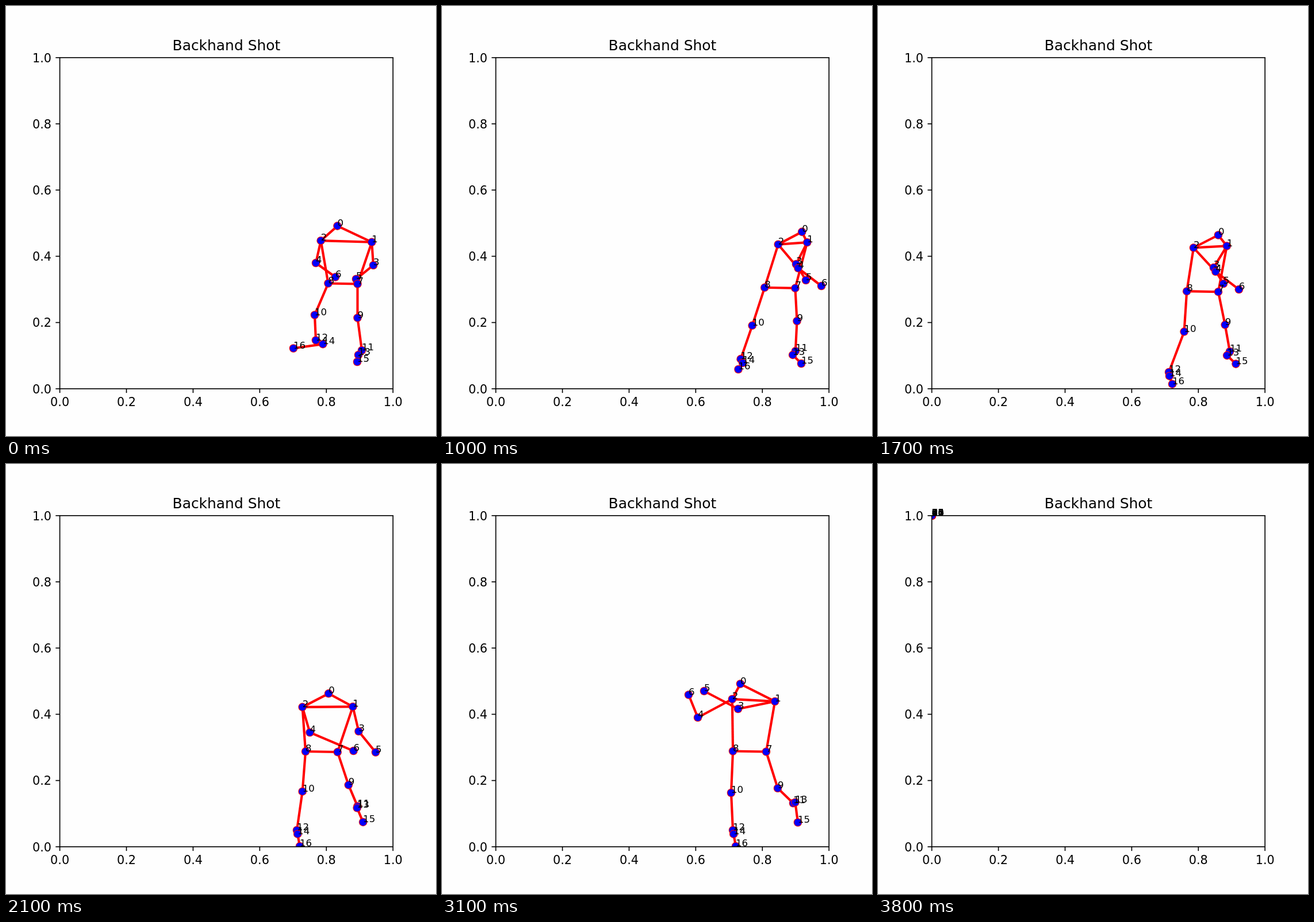
These frames come from a looping animation (748 by 748 pixels, 6100 ms). An HTML page with a canvas:

```html
<!DOCTYPE html>
<html lang="en">
<head>
<meta charset="utf-8">
<title>Backhand Shot</title>
<style>
  html, body { margin: 0; width: 100%; height: 100%; overflow: hidden; background: #fefefe; }
  canvas { display: block; }
</style>
</head>
<body>
<canvas id="plot" width="748" height="748"></canvas>
<script>
const ctx = document.getElementById('plot').getContext('2d');
const SIZE = 748, PT = SIZE / 360;
const LEFT = 93.6, RIGHT = 673.2, TOP = 89.8, BOTTOM = 665.8;
const LOOP = 6100, STEP = 100, LOST = 3800, FINISH = 3100;
const JOINTS = 17;

// Odd joints are the left side of the body, even ones the right.
// Each limb joint hangs on the one two before it, the hips on the shoulders.
const BONES = [[0, 1], [0, 2], [1, 2], [7, 8]];
for (let j = 3; j < JOINTS; j++) BONES.push([j === 7 || j === 8 ? j - 6 : j - 2, j]);

const clamp = (v, lo, hi) => Math.min(Math.max(v, lo), hi);
const add = (p, dx, dy) => ({ x: p.x + dx, y: p.y + dy });

// Straight moves through keys [time, x, y, ...], at rest before and after
function path(...keys) {
  return t => {
    const i = clamp(keys.findIndex(k => k[0] > t), 0, keys.length - 1);
    const b = t >= keys[keys.length - 1][0] ? keys[keys.length - 1] : keys[i];
    const a = keys[Math.max(keys.indexOf(b) - 1, 0)];
    const u = a === b ? 1 : clamp((t - a[0]) / (b[0] - a[0]), 0, 1);
    const v = a.map((n, c) => n + (b[c] - n) * u);
    return { x: v[1], y: v[2] };
  };
}

const chest = path([0, 592, 409.5], [1000, 610, 413], [2100, 559.5, 422.5], [3100, 542, 411]);
const pelvis = path([0, 586, 483], [1100, 588, 491], [2200, 545, 501.5], [3100, 535, 500]);

// Arms relative to the chest: ready, coiled (held), open, swing, finish
const ARM_TIMES = [0, 700, 1700, 2100, 2700, FINISH];
const arm = (ready, coiled, open, swing, finish) =>
  path(...[ready, coiled, coiled, open, swing, finish].map((p, i) => [ARM_TIMES[i], ...p]));
const arms = [
  arm([47, 41.5], [6, 36], [54, 42.5], [-5, 36.5], [-27, 15]),
  arm([-53, 37.5], [9.5, 43], [-31, 44.5], [-76, 35], [-97, 30]),
  arm([17, 65.5], [23, 64], [83.5, 79], [-74.5, 17], [-86, -16]),
  arm([-19, 62], [50, 74], [45, 76.5], [-98, 21.5], [-113, -9.5])
];

const knees = [
  path([0, 611.5, 542.5], [1000, 617.5, 548], [2700, 584, 564]),
  path([0, 537, 537.5], [1500, 541, 565], [2400, 503, 572])
];
const ankles = [
  path([0, 619, 599], [1700, 612, 601], [2500, 611, 590]),
  path([0, 539, 581.5], [1700, 506, 637])
];
const toes = [
  path([0, 611, 619], [1000, 625, 622], [2700, 619, 623.5]),
  path([0, 500, 595.5], [1000, 515.5, 632], [1900, 511, 665])
];

function figure(time) {
  const t = Math.min(time, FINISH);
  const at = part => part(t);
  const c = chest(t), h = pelvis(t);

  // The body turns away and back; this narrows the shoulders and shifts the head
  const twist = Math.cos(Math.PI * (t - 1300) / 1800);
  const half = 47 - 17.5 * (twist + 0.25) ** 2;
  const tilt = -2 * twist;
  const hip = 25.5 + t / 900;

  const [ankleL, ankleR] = ankles.map(at);
  const [toeL, toeR] = toes.map(at);
  const lift = toeL.y - ankleL.y - 20;
  const heelL = add(ankleL, 0.7 * lift - 6, 8 - 0.7 * lift);
  const heelR = add(ankleR, 2.5 - 0.25 * (toeR.x - ankleR.x), 6.7);

  return [
    add(c, 21 * twist - 2, 4.5 * twist - 24),
    add(c, half, tilt), add(c, -half, -tilt),
    ...arms.map(at).map(p => add(c, p.x, p.y)),
    add(h, hip, 0.5), add(h, -hip, -0.5),
    ...knees.map(at),
    ankleL, ankleR, heelL, heelR, toeL, toeR
  ];
}

function line(x1, y1, x2, y2) {
  ctx.beginPath();
  ctx.moveTo(x1, y1);
  ctx.lineTo(x2, y2);
  ctx.stroke();
}

function dot(p, r, color) {
  ctx.fillStyle = color;
  ctx.beginPath();
  ctx.arc(p.x, p.y, r, 0, 2 * Math.PI);
  ctx.fill();
}

function text(str, x, y, pt, align) {
  ctx.font = `${pt * PT}px "DejaVu Sans", sans-serif`;
  ctx.textAlign = align;
  ctx.fillText(str, x, y);
}

function drawSkeleton(points) {
  ctx.save();
  ctx.beginPath();
  ctx.rect(LEFT, TOP, RIGHT - LEFT, BOTTOM - TOP);
  ctx.clip();
  ctx.strokeStyle = '#f00';
  ctx.lineWidth = 2 * PT;
  ctx.lineCap = 'square';
  for (const [a, b] of BONES) line(points[a].x, points[a].y, points[b].x, points[b].y);
  for (const p of points) {
    dot(p, 3.5 * PT, '#f00');
    dot(p, 3 * PT, '#00f');
  }
  ctx.restore();
}

function drawAxes() {
  const tick = 3.5 * PT;
  ctx.strokeStyle = ctx.fillStyle = '#000';
  ctx.lineWidth = 0.8 * PT;
  ctx.lineCap = 'butt';
  ctx.strokeRect(LEFT, TOP, RIGHT - LEFT, BOTTOM - TOP);
  for (let i = 0; i <= 5; i++) {
    const x = LEFT + (RIGHT - LEFT) * i / 5;
    const y = BOTTOM + (TOP - BOTTOM) * i / 5;
    const label = (i / 5).toFixed(1);
    line(x, BOTTOM, x, BOTTOM + tick);
    line(LEFT, y, LEFT - tick, y);
    text(label, x, 696.3, 10, 'center');
    text(label, LEFT - 2 * tick, y + 7.8, 10, 'right');
  }
  text('Backhand Shot', (LEFT + RIGHT) / 2, TOP - 6 * PT, 12, 'center');
}

function draw(t) {
  const points = t < LOST ? figure(t) : Array(JOINTS).fill({ x: LEFT, y: TOP });
  ctx.fillStyle = '#fefefe';
  ctx.fillRect(0, 0, SIZE, SIZE);
  drawSkeleton(points);
  drawAxes();
  points.forEach((p, j) => text(String(j), p.x, p.y, 8, 'left'));
}

const start = performance.now();
function tick() {
  const t = (performance.now() - start) % LOOP;
  draw(Math.floor(t / STEP) * STEP);
  requestAnimationFrame(tick);
}
tick();
</script>
</body>
</html>
```
